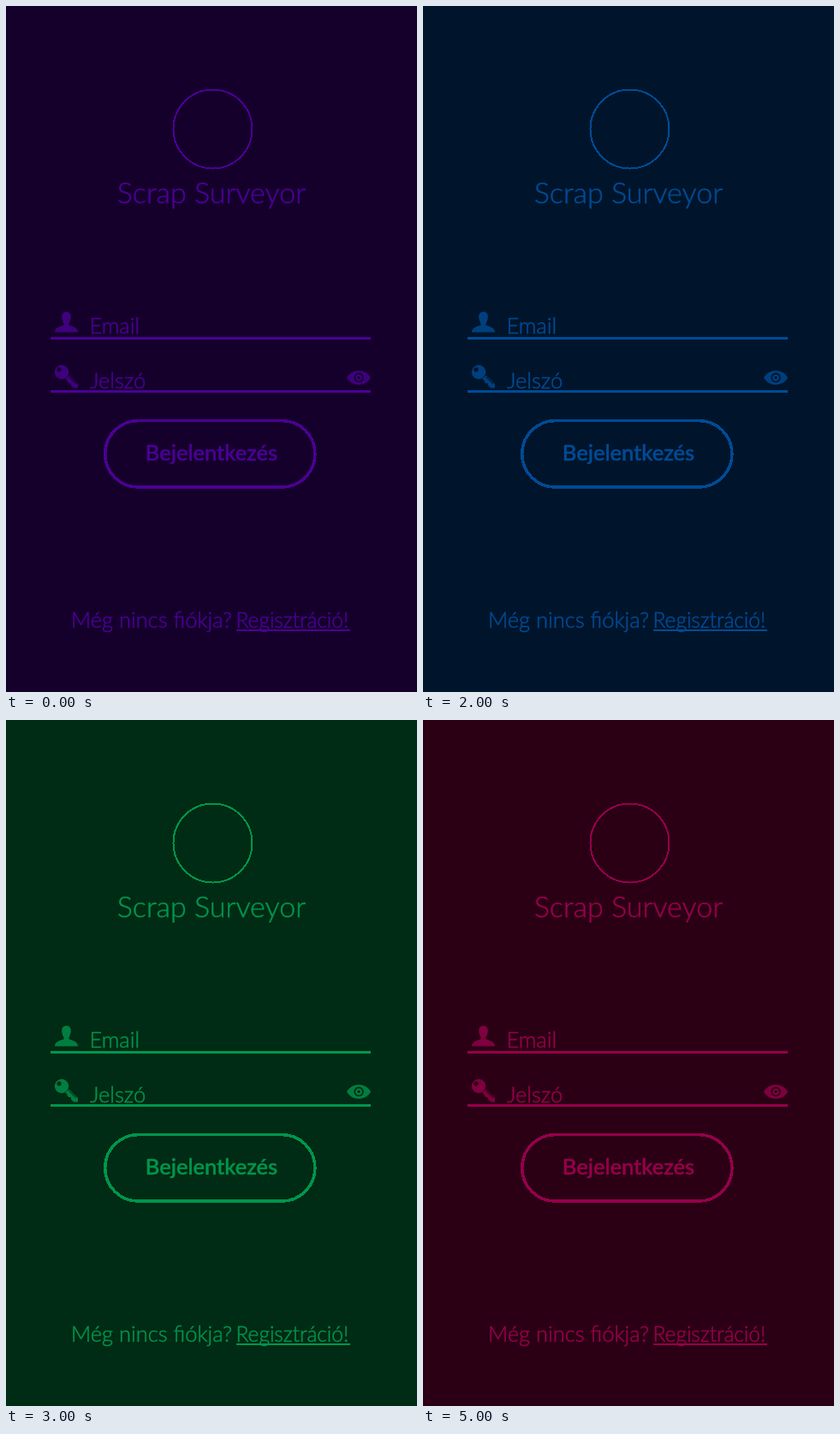
These frames come from a looping animation (480 by 800 pixels, 6000 ms). An HTML page:

```html
<!DOCTYPE html>
<html lang="hu">
<head>
<meta charset="utf-8">
<title>Bejelentkezés</title>
<style>
  html, body { margin: 0; width: 100%; height: 100%; overflow: hidden; }
  svg { display: block; width: 480px; height: 800px; }
  text {
    font: 300 25.5px Lato, "Open Sans", sans-serif;
    fill: currentColor; stroke: currentColor; stroke-width: .5px;
  }
  .title { font-size: 34px; text-anchor: middle; }
  .action { font-size: 25.5px; font-weight: 500; text-anchor: middle; }
  .link { font-size: 24.5px; }
  .line { fill: none; stroke: currentColor; shape-rendering: crispEdges; }
  .icon { fill: currentColor; fill-rule: evenodd; opacity: .78; }
</style>
</head>
<body>
<svg id="screen" viewBox="0 0 480 800">
  <circle class="line" cx="241.5" cy="143.5" r="46" stroke-width="2"/>
  <text class="title" x="240" y="230">Scrap Surveyor</text>

  <!-- email field -->
  <path class="icon" d="M70.5 356.5c4 0 5.500 3 5.300 6.500-.2 3-1.300 5.500-2.300 7v2.200c5 1.500 10.500 3.300 10.500 8.300H57c0-5 5.500-6.800 10.500-8.300V370c-1-1.500-2.100-4-2.300-7-.2-3.500 1.300-6.500 5.300-6.500z"/>
  <text x="97.500" y="381.500">Email</text>
  <path class="line" stroke-width="3" d="M52 387.500H426"/>

  <!-- password field -->
  <g class="icon">
    <path d="M65 418.800a8.200 8.200 0 1 0 .1 0zM62 421.500a2.600 2.600 0 1 0 .1 0z"/>
    <path d="M74 431L84 441V445.500H79L76 442.500V440H73.500L71.500 438V436.500L69 434.500zM73.500 433L81.500 441l.7-.7-8-8z"/>
  </g>
  <text x="98" y="445.500">Jelszó</text>
  <path class="icon" d="M398 433.500C404 422.500 420 422.500 426 433.500C420 444.500 404 444.500 398 433.500zM412 427.700a5.700 5.700 0 1 0 .1 0zM412 429.400a4 4 0 1 0 .1 0zM412 431.700a1.700 1.700 0 1 0 .1 0z"/>
  <path class="line" stroke-width="3" d="M52 449.500H426"/>

  <rect class="line" x="115.700" y="483.600" width="245.200" height="77.500" rx="38.750" stroke-width="3.500"/>
  <text class="action" x="240" y="530">Bejelentkezés</text>

  <text x="76" y="725">Még nincs fiókja?</text>
  <text class="link" x="268.500" y="725">Regisztráció!</text>
  <path class="line" stroke-width="2" d="M269 728H402"/>
</svg>
<script>
  const hues = [270, 90, 210, 150, 30, 330];
  const theme = hue => ({
    backgroundColor: `hsl(${hue}, 100%, 8.4%)`,
    color: `hsl(${hue}, 100%, 29.4%)`
  });
  const steps = hues.map((hue, i) => ({
    ...theme(hue), offset: i / hues.length, easing: "step-end"
  }));
  steps.push({ ...theme(hues[hues.length - 1]), offset: 1 });

  document.getElementById("screen").animate(steps, {
    duration: 6000, iterations: Infinity
  });
</script>
</body>
</html>
```
